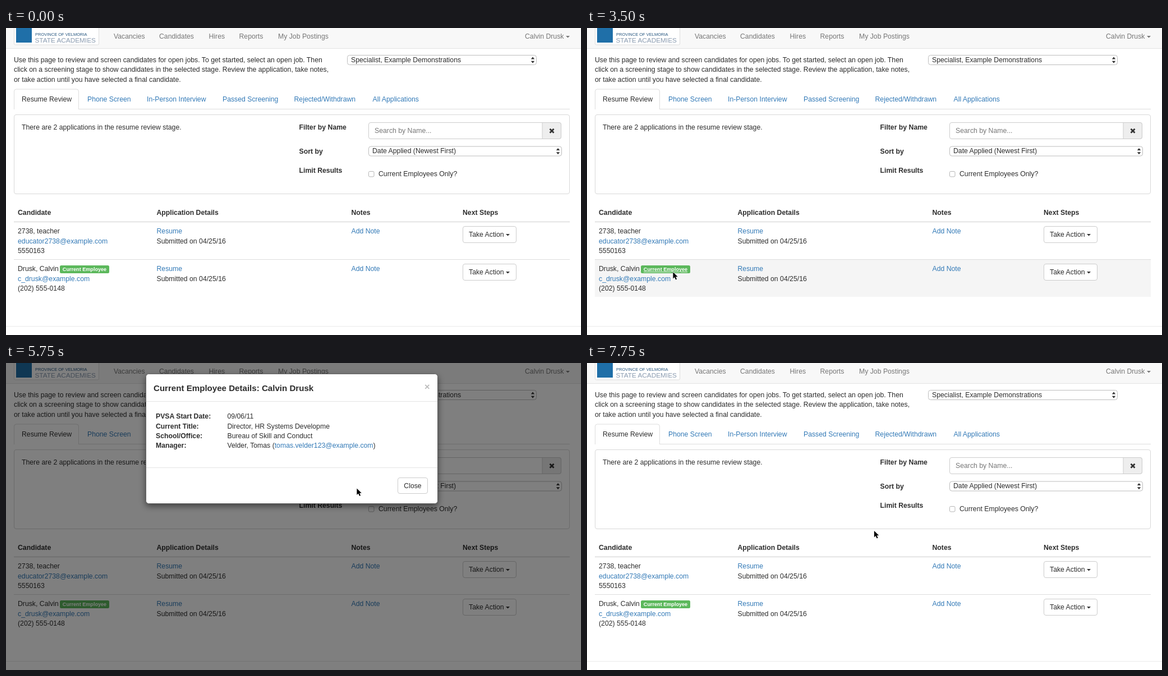
These frames come from a looping animation (1025 px wide and 547 px high, 8000 ms). An HTML page:

```html
<!DOCTYPE html>
<html lang="en">
<head>
<meta charset="utf-8">
<title>Resume review</title>
<style>
  html, body { margin: 0; width: 100%; height: 100%; overflow: hidden; background: #fff; }
  svg { display: block; width: 1025px; height: 547px; }
  text { font: 12.25px "Liberation Sans", Arial, sans-serif; fill: #2d2d2d; white-space: pre; }
  .b { font-weight: bold; }
  .link { fill: #337ab7; }
  .nav { fill: #777; }
  .badge { font-size: 9.1px; font-weight: bold; fill: #fff; }
  .title { font-size: 15.1px; font-weight: bold; }
  .mid { text-anchor: middle; }
  .off { display: none; }
  .hot .badge { text-decoration: underline; }
</style>
</head>
<body>
<svg id="stage" viewBox="0 0 1025 547">
  <defs>
    <linearGradient id="pale" x2="0" y2="1">
      <stop stop-color="#cbe4c4"/><stop offset="1" stop-color="#a9d09e"/>
    </linearGradient>
    <linearGradient id="vivid" x2="0" y2="1">
      <stop stop-color="#6cc04f"/><stop offset=".5" stop-color="#3aa01e"/><stop offset="1" stop-color="#4cae31"/>
    </linearGradient>
    <filter id="soft" x="-10%" y="-10%" width="120%" height="130%">
      <feGaussianBlur stdDeviation="6"/>
    </filter>
  </defs>
  <g id="page"></g>
  <rect id="shade" width="1025" height="547" fill="#000" opacity=".5"/>
  <g id="modal"></g>
  <g id="updating"></g>
  <path id="cursor" d="M.9 .9V12.6L3.6 10.1L5.6 14.5L7.6 13.6L5.6 9.3H9.3Z"
        fill="#000" stroke="#fff" stroke-width="1" paint-order="stroke"/>
</svg>
<script>
const $ = id => document.getElementById(id);

const text = (x, y, s, cls = '') => `<text x="${x}" y="${y}" class="${cls}">${s}</text>`;
const box = (x, y, w, h, fill = '#fff', stroke = 'none', r = 0, extra = '') =>
  `<rect x="${x}" y="${y}" width="${w}" height="${h}" rx="${r}" fill="${fill}" stroke="${stroke}" ${extra}/>`;
const shape = (d, fill, stroke = 'none') => `<path d="${d}" fill="${fill}" stroke="${stroke}"/>`;
const rule = (x, y, w, color, h = 1) => box(x, y, w, h, color);
const caret = (x, y, color) => shape(`M${x} ${y}h7l-3.5 3.6z`, color);

const select = (x, y, w, label) =>
  box(x + .5, y + .5, w - 1, 17, '#fff', '#bdbdbd', 4) +
  text(x + 7, y + 12.8, label) +
  shape(`M${x + w - 10.2} ${y + 7.6}l3.2-4 3.2 4zm0 3.2l3.2 4 3.2-4z`, '#333');

const action = y =>
  box(814.5, y + .5, 95, 29, '#fff', '#ccc', 3.5) +
  text(825, y + 19.2, 'Take Action') + caret(891, y + 14, '#333');

const row = (y, name, mail, id) =>
  text(21, y, name) + text(21, y + 17.5, mail, 'link') + text(21, y + 35, id) +
  text(268.5, y, 'Resume', 'link') + text(268.5, y + 17.5, 'Submitted on 04/25/16') +
  text(615.5, y, 'Add Note', 'link') + action(y - 13);

const list = (y, cls, items) => items.map(([x, s]) => text(x, y, s, cls)).join('');

const PERSON = 'Calvin Drusk';

$('page').innerHTML =
  // navigation bar
  box(0, 0, 1025, 36, '#f8f8f8') + rule(0, 36, 1025, '#e4e4e4') +
  box(14.5, -5, 151, 35, '#fff', '#ddd', 2) + box(18, 0, 28, 26, '#1f6fa8') +
  '<g style="--c:0">' +
  '<text x="52" y="14.3" style="font-size:7.5px;fill:#24557f">PROVINCE OF VELMORIA</text>' +
  '<text x="51.5" y="25.6" style="font-size:11.8px;fill:#8a9bb0">STATE ACADEMIES</text></g>' +
  list(19.2, 'nav', [[192, 'Vacancies'], [273, 'Candidates'], [361.5, 'Hires'],
    [415.5, 'Reports'], [485, 'My Job Postings'], [925, PERSON]]) +
  caret(998, 14, '#777') +
  // introduction and job choice
  ['Use this page to review and screen candidates for open jobs. To get started, select an open job. Then',
   'click on a screening stage to show candidates in the selected stage. Review the application, take notes,',
   'or take action until you have selected a final candidate.']
    .map((s, i) => text(14, 61 + i * 17.4, s)).join('') +
  select(608, 48, 338, 'Specialist, Example Demonstrations') +
  // tabs
  rule(14, 144, 991, '#ddd') +
  shape('M14.5 145V113q0-4 4-4H125.500q4 0 4 4V145', '#fff', '#ddd') +
  text(28, 131.2, 'Resume Review', 'tab') +
  list(131.2, 'link', [[145, 'Phone Screen'], [251, 'In-Person Interview'], [386, 'Passed Screening'],
    [513.5, 'Rejected/Withdrawn'], [653.5, 'All Applications']]) +
  // filter panel
  box(14.5, 154.5, 990, 141, '#fff', '#d8d8d8', 3.5) +
  text(28, 181, 'There are 2 applications in the resume review stage.') +
  text(522.5, 181, 'Filter by Name', 'b') + text(522.5, 223.6, 'Sort by', 'b') +
  text(522.5, 258.4, 'Limit Results', 'b') +
  box(646.5, 168.5, 343, 29, '#fff', '#ccc', 3.5) +
  shape('M956 168.500H986q3.500 0 3.500 3.500V194q0 3.500-3.500 3.500H956z', '#eee', '#ccc') +
  '<path d="M969.500 179.800l7 7m0-7l-7 7" stroke="#333" stroke-width="2.800"/>' +
  text(657, 187.2, 'Search by Name...', 'nav') +
  select(646, 210.500, 345, 'Date Applied (Newest First)') +
  box(646.5, 255.5, 9.5, 9.5, '#fff', '#b5b5b5', 2) + text(664, 264.4, 'Current Employees Only?') +
  // candidate table
  list(333.2, 'b', [[21, 'Candidate'], [268.5, 'Application Details'], [615.5, 'Notes'], [814, 'Next Steps']]) +
  rule(14, 344.6, 991, '#ddd', 1.6) +
  box(14, 413, 991, 66, '#f5f5f5', 'none', 0, 'id="hover"') +
  rule(14, 412, 991, '#ddd') +
  row(366, '2738, teacher', 'educator2738@example.com', '5550163') +
  row(433, 'Drusk, Calvin', 'c_drusk@example.com', '(202) 555-0148') +
  box(96, 423, 88, 14, '#5cb85c', 'none', 2.5) + text(140, 433.300, 'Current Employee', 'badge mid') +
  rule(0, 531, 1025, '#eaeaea');

$('modal').innerHTML =
  box(249, 24, 521, 231, '#000', 'none', 5, 'opacity=".5" filter="url(#soft)"') +
  box(249.5, 19.5, 520, 231, '#fff', '#666', 5) +
  text(263, 49.600, `Current Employee Details: ${PERSON}`, 'title') +
  '<path d="M747.300 38.800l7 7m0-7l-7 7" stroke="#bbb" stroke-width="1.800"/>' +
  rule(250, 68, 519, '#e5e5e5') + rule(250, 186, 519, '#e5e5e5') +
  [['PVSA Start Date:', '09/06/11'],
   ['Current Title:', 'Director, HR Systems Developme'],
   ['School/Office:', 'Bureau of Skill and Conduct'],
   ['Manager:', 'Velder, Tomas (<tspan class="link">tomas.velder123@example.com</tspan>)']]
    .map(([k, v], i) => text(267, 99.2 + i * 17.4, k, 'b') +
      `<g class="value">${text(394.5, 99.2 + i * 17.4, v)}</g>`).join('') +
  box(697.5, 203, 55, 31, 'none', '#5a9fe8', 4, 'id="ring" stroke-width="2.6"') +
  box(698.5, 204.5, 53, 28, '#fff', '#ccc', 3.5, 'id="close"') +
  text(725, 222.8, 'Close', 'mid');

$('updating').innerHTML =
  box(336.5, 90.5, 346, 86, '#fff', '#000') + text(509.5, 116, 'Updating', 'b mid') +
  box(424.5, 145.5, 170, 17, '#f2f8f0', '#93a98f') +
  Array.from({ length: 13 }, (_, i) =>
    box(426 + i * 13, 147.5, 11, 13, `url(#${i < 9 ? 'pale' : 'vivid'})`, 'none', 2.2)).join('');

// [start ms, cursor x, cursor y]
const PATH = [
  [500, 250, 213], [750, 178, 308], [1000, 155, 358], [1750, 155, 377], [2000, 154, 416],
  [2250, 154, 420], [3000, 153, 429], [3250, 152, 433], [3500, 152.5, 434],
  [4750, 185, 404], [5000, 341, 304], [5250, 526, 243], [5750, 624.5, 222.5],
  [6000, 690, 216], [6250, 720, 217], [7750, 511, 298]
];

function draw(t) {
  const during = (a, b) => t >= a && t < b;
  const show = (id, on) => $(id).classList.toggle('off', !on);
  const pos = PATH.findLast(p => p[0] <= t);
  show('cursor', !!pos);
  if (pos) $('cursor').setAttribute('transform', `translate(${pos[1]} ${pos[2]})`);

  show('hover', during(2750, 4750));
  $('page').classList.toggle('hot', during(3000, 4750));

  const open = during(4000, 7500);
  show('shade', open);
  show('modal', open);
  show('updating', during(4000, 4250));

  const over = during(6250, 7500);
  $('close').setAttribute('fill', over ? '#e6e6e6' : '#fff');
  $('close').setAttribute('stroke', over ? '#adadad' : '#ccc');
  show('ring', during(7250, 7500));
}

function tick() {
  draw(performance.now() % 8000);
  requestAnimationFrame(tick);
}
tick();
</script>
</body>
</html>
```
